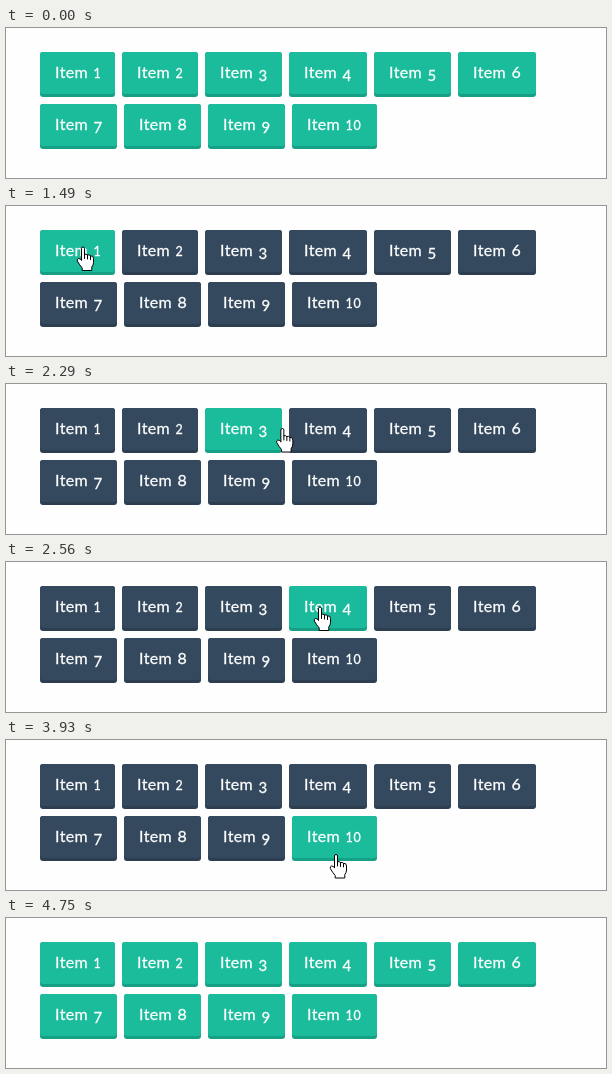
Animation of 600 by 150 pixels, one loop 5.45 s. Source, as an HTML page:

```html
<!DOCTYPE html>
<html lang="en">
<head>
<meta charset="utf-8">
<title>Hover menu</title>
<style>
html, body { margin: 0; width: 100%; height: 100%; overflow: hidden; background: #fefefe; }
svg { display: block; width: 600px; height: 150px; }
text { font: 16px Lato, "Open Sans", sans-serif; letter-spacing: .4px; fill: #fff; stroke: #fff; stroke-width: .3px; }
.small { font-size: 12.5px; }
.hang { font-size: 15px; }
#hand, #arrow { fill: #fff; stroke: #000; stroke-linejoin: round; stroke-linecap: round; }
</style>
</head>
<body>
<svg viewBox="0 0 600 150">
  <g id="menu"></g>
  <path id="hand" d="M-.5 13V1.5Q-.5 0 1 0T2.5 1.5V7.5Q4 6.3 5.5 8.1Q7.2 7.1 8.5 8.9Q11.5 8.3 11.5 11.5V15.5Q11.5 18 9.8 20V23.5H.2V21Q-2.5 18-4.6 14.1Q-5.3 12.1-3.6 11.5Q-2.2 11.3-.5 13ZM2.5 7.5V11.5M5.5 8.1V12M8.5 8.9V12.5"/>
  <path id="arrow" d="M.5.5V16.5L4.2 13L6.6 18.6L9 17.5L6.6 12H11.8Z"/>
</svg>
<script>
const NS = 'http://www.w3.org/2000/svg';
const LOOP = 5450, FADE = 200;
const LEFT = 34, TOP = 24, RIGHT = 529, BOTTOM = 121, HEIGHT = 45, GAP = 7;
const GREEN = [26, 188, 156], GREEN_EDGE = [22, 160, 133];
const DARK = [52, 73, 94], DARK_EDGE = [44, 62, 80];

const linear = p => p;
const speedUp = p => p ** 1.5;
const slowDown = p => 1 - (1 - p) ** 1.5;

// The pointer moves in short bursts and rests between them
const moves = [
  { start: 560, end: 1000, steps: 5, from: [62, 0], to: [68, 38], curve: slowDown },
  { start: 1490, end: 2030, steps: 6, from: [76, 41], to: [208, 44], curve: speedUp },
  { start: 2110, end: 2560, steps: 5, from: [232, 44], to: [313, 45], curve: slowDown },
  { start: 2840, end: 3290, steps: 5, from: [326, 62], to: [329, 109.5], curve: linear },
  { start: 3930, end: 4380, steps: 5, from: [329, 114.5], to: [338, 136], curve: linear },
  { start: 4480, end: 4750, steps: 3, from: [357, 137], to: [485, 148], curve: linear }
];

const frames = moves.flatMap(({ start, end, steps, from, to, curve }) =>
  Array.from({ length: steps + 1 }, (_, i) => {
    const k = curve(i / steps);
    return {
      time: start + (end - start) * i / steps,
      x: from[0] + (to[0] - from[0]) * k,
      y: from[1] + (to[1] - from[1]) * k
    };
  }));

const menu = document.getElementById('menu');
const hand = document.getElementById('hand');
const arrow = document.getElementById('arrow');

function add(parent, tag, attrs, content) {
  const el = document.createElementNS(NS, tag);
  for (const k in attrs) el.setAttribute(k, attrs[k]);
  if (content) el.textContent = content;
  return parent.appendChild(el);
}

const advance = d => ({ 0: 10, 1: 8, 2: 9, 7: 9.6 })[d] || 10.4;

// Old-style figures: 0-2 at x-height, 6 and 8 tall, the rest hang below
function addLabel(x, y, digits) {
  const text = add(menu, 'text', { x: x + 15, y }, 'Item ');
  let dx = x + 53.5;
  for (const d of digits) {
    const kind = d < 3 ? 'small' : '68'.includes(d) ? 'tall' : 'hang';
    add(text, 'tspan', { x: dx, y: kind === 'hang' ? y + 2.5 : y, class: kind }, d);
    dx += advance(d);
  }
}

function addButton(left, y, n) {
  const digits = [...String(n)];
  const size = digits.reduce((sum, d) => sum + advance(d), 67);
  const x = Math.round(left), width = Math.round(left + size) - x;
  const edge = add(menu, 'rect', { x, y, width, height: HEIGHT, rx: 3 });
  const face = add(menu, 'rect', { x, y, width, height: HEIGHT - 3, rx: 3 });
  addLabel(x, y + 26, digits);
  return { x, y, width, size, edge, face, changes: [] };
}

const buttons = [];
for (let n = 1, left = LEFT; n <= 10; n++) {
  if (n === 7) left = LEFT;
  const b = addButton(left, n < 7 ? TOP : TOP + 52, n);
  buttons.push(b);
  left += b.size + GAP;
}

const hits = (b, x, y) => x >= b.x && x <= b.x + b.width && y >= b.y && y <= b.y + HEIGHT;

// Hovering the list dims every button except the one under the pointer
for (const { time, x, y } of frames) {
  const inList = x >= LEFT && x <= RIGHT && y >= TOP && y <= BOTTOM;
  for (const b of buttons) {
    const target = !inList || hits(b, x, y) ? 1 : 0;
    const last = b.changes.length ? b.changes[b.changes.length - 1].target : 1;
    if (target !== last) b.changes.push({ time, target });
  }
}

const bezier = (u, a, b) => 3 * u * (1 - u) ** 2 * a + 3 * u * u * (1 - u) * b + u ** 3;

// CSS "ease" timing
function ease(p) {
  if (p >= 1) return 1;
  let lo = 0, hi = 1;
  for (let i = 0; i < 16; i++) {
    const mid = (lo + hi) / 2;
    if (bezier(mid, .25, .25) < p) lo = mid; else hi = mid;
  }
  return bezier(lo, .1, 1);
}

function toneAt(changes, t) {
  let tone = 1;
  changes.forEach(({ time, target }, i) => {
    if (t < time) return;
    const next = changes[i + 1];
    const until = next ? Math.min(t, next.time) : t;
    tone += (target - tone) * ease((until - time) / FADE);
  });
  return tone;
}

const mix = (a, b, k) => `rgb(${a.map((c, i) => Math.round(c + (b[i] - c) * k))})`;

function draw(t) {
  const passed = frames.filter(f => f.time <= t + 4);
  const frame = passed[passed.length - 1];
  const now = frame ? frame.time : 0;
  for (const b of buttons) {
    const k = toneAt(b.changes, now);
    b.face.setAttribute('fill', mix(DARK, GREEN, k));
    b.edge.setAttribute('fill', mix(DARK_EDGE, GREEN_EDGE, k));
  }
  const shown = frame && passed.length < frames.length;
  const over = shown && buttons.some(b => hits(b, frame.x, frame.y));
  hand.style.display = over ? '' : 'none';
  arrow.style.display = shown && !over ? '' : 'none';
  if (shown) (over ? hand : arrow).setAttribute('transform', `translate(${frame.x} ${frame.y})`);
}

const begin = performance.now();
function tick() {
  draw((performance.now() - begin) % LOOP);
  requestAnimationFrame(tick);
}
tick();
</script>
</body>
</html>
```
